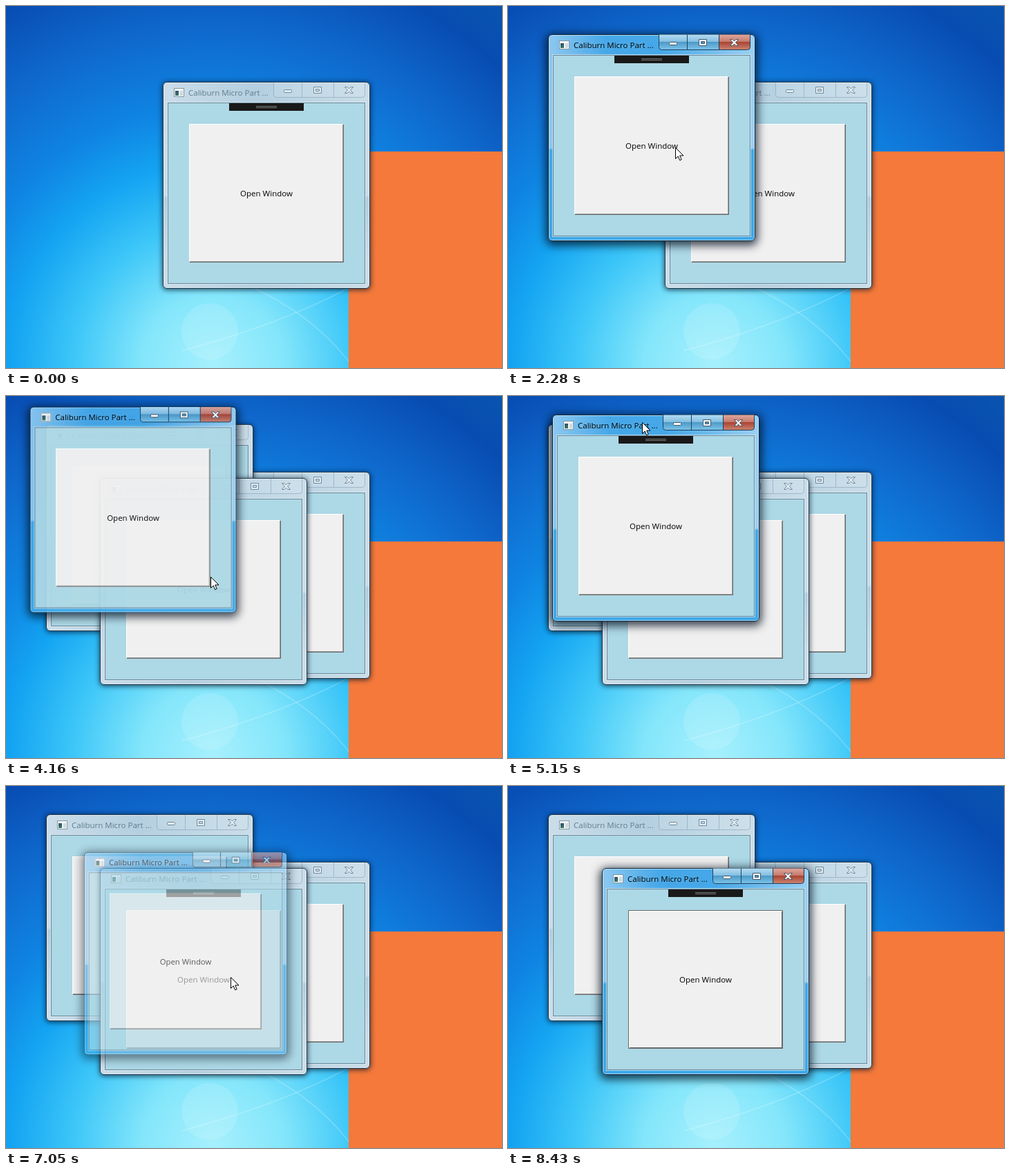
These frames come from a looping animation (718x525 px, 9020 ms). An HTML page:

```html
<!DOCTYPE html>
<html lang="en">
<head>
<meta charset="utf-8">
<style>
html, body { margin: 0; width: 100%; height: 100%; overflow: hidden; }
body { position: relative; font: 11.5px "Open Sans", "Noto Sans", sans-serif; color: #000; }
div, svg { position: absolute; box-sizing: border-box; }
.win {
  left: 0; top: 0; width: 300px; height: 300px; border-radius: 6px;
  border: 1px solid #26384a;
  background: linear-gradient(#cfdfe900 0 55%, #8fb4cd66 56%, #cfdfe900 85%),
    linear-gradient(90deg, #cbdde9, #b4cfe0 45%, #cadde8);
  box-shadow: inset 0 0 0 1px #e4f0f7cc, 0 1px 7px 1px #001428b0;
}
.win.active {
  background: linear-gradient(#0000 0 55%, #3ea8e8 56%),
    linear-gradient(90deg, #8cc8f0, #46a8e8 28% 55%, #9bd0f2);
  border-color: #10283c;
  box-shadow: inset 0 0 0 1px #c4e8fccc, 0 3px 13px 3px #000d1cc8;
}
.win > * { margin: -1px 0 0 -1px; }
.icon { left: 16px; top: 9px; width: 15px; height: 13px; border: 1px solid #8598a4; background: #f4f8fa; }
.icon::before { content: ""; position: absolute; left: 1px; top: 3px; width: 5px; height: 7px; background: linear-gradient(#31506b, #3c7a66); }
.icon::after { content: ""; position: absolute; left: 8px; top: 3px; width: 4px; height: 7px; background: #cfd8de; }
.title { left: 37px; top: 8px; line-height: 16px; white-space: pre; color: #5f7d8f; }
.active .title { color: #000; text-shadow: 0 0 5px #9cd4f688; }
.caption { left: 160px; top: 0; }
.caption .cell { fill: #dcebf222; }
.caption .edge { fill: none; stroke: #7f9bae88; }
.caption .glyph { fill: #e2edf3; stroke: #71899a; }
.active .cell { fill: url(#blueCell); }
.active .cell.close { fill: url(#redCell); }
.active .hot.cell.close { fill: #e05c38; }
.active .edge { stroke: #1d425d; }
.active .glyph { fill: #fff; stroke: #40586a; }
.client { left: 7px; top: 30px; width: 286px; height: 263px; background: #add8e6; border: 1px solid #6b8797; box-shadow: 0 0 0 1px #e2f1f8aa; }
.bar { left: 96px; top: 31px; width: 108px; height: 11px; background: #191919; }
.bar::after { content: ""; position: absolute; left: 39px; top: 4px; width: 30px; height: 3px; border: solid #777; border-width: 1px 0; box-sizing: border-box; }
.button {
  left: 38px; top: 61px; width: 224px; height: 201px; line-height: 200px; text-align: center;
  background: #f0f0f0; border: 1px solid; border-color: #fff #696969 #696969 #fff;
  box-shadow: inset -1px -1px #a0a0a0;
}
.focus .button { border-color: #696969; box-shadow: inset 1px 1px #fff, inset -1px -1px #696969; }
#cursor { left: 0; top: 0; z-index: 9; }
</style>
</head>
<body>
<svg width="718" height="525">
  <defs>
    <radialGradient id="sky" gradientUnits="userSpaceOnUse" cx="300" cy="520" r="680">
      <stop offset="0" stop-color="#a6f0fd"/><stop offset=".15" stop-color="#84e6fb"/>
      <stop offset=".3" stop-color="#3cc6f8"/><stop offset=".43" stop-color="#14a4f2"/>
      <stop offset=".55" stop-color="#0f84e2"/><stop offset=".72" stop-color="#0f68cc"/>
      <stop offset=".88" stop-color="#084cb2"/><stop offset="1" stop-color="#0a56ae"/>
    </radialGradient>
    <linearGradient id="blueCell" x2="0" y2="1">
      <stop offset="0" stop-color="#b4dcf2"/><stop offset=".45" stop-color="#86bfe2"/>
      <stop offset=".5" stop-color="#4d9ac8"/><stop offset="1" stop-color="#7cc4ea"/>
    </linearGradient>
    <linearGradient id="redCell" x2="0" y2="1">
      <stop offset="0" stop-color="#dfa79c"/><stop offset=".45" stop-color="#c77b6d"/>
      <stop offset=".5" stop-color="#aa4434"/><stop offset="1" stop-color="#cc8470"/>
    </linearGradient>
  </defs>
  <rect width="718" height="525" fill="url(#sky)"/>
  <g fill="none" stroke="#fff" stroke-opacity=".22" stroke-width="1.5">
    <path d="M255 500Q420 455 520 395"/>
    <path d="M350 405Q450 450 503 525"/>
  </g>
  <circle cx="295" cy="472" r="41" fill="#fff" fill-opacity=".12"/>
  <rect x="496" y="211" width="314" height="314" fill="#f4793b"/>
</svg>
<svg id="cursor" width="14" height="21">
  <path d="M.5.5V16.5L4.2 13 6.7 18.8 9.2 17.7 6.7 12H12Z" fill="#fff" stroke="#000"/>
</svg>
<script>
const LOOP = 9020, FADE = 200;

// Screen updates come in bursts: start, end, number of updates.
const bursts = [
  [110, 730, 9], [900, 1280, 6], [1600, 2360, 11], [2740, 3610, 12], [3680, 3760, 2], [3990, 4840, 12],
  [4920, 4990, 2], [5150, 6010, 12], [6180, 6800, 9], [6960, 7820, 12], [7960, 8430, 7]
];

// Each key: time, x, y.
const pointer = [
  [0, 607, 530], [110, 607, 514], [730, 359, 118], [900, 359, 118], [1280, 380, 260], [1700, 380, 260],
  [2360, 224, 198], [3180, 224, 198], [3610, 324, 270], [3760, 296, 262], [4250, 296, 262],
  [4840, 219, 19], [4990, 164, 26], [5150, 194, 38], [5540, 275, 72], [6010, 424, 71], [6180, 424, 71],
  [6800, 325, 277], [7350, 325, 277], [7820, 382, 103], [7960, 382, 103], [8430, 630, 530]
];

const windows = [
  { path: [[0, 227, 110]], open: -FADE, active: [[900, 1600]], bar: [[0, 1600]] },
  { path: [[0, 58, 41]], open: 1750, active: [[1750, 2960]], bar: [[2050, 2740]] },
  { path: [[0, 136, 119]], open: 2960, active: [[2960, 3990], [6180, 6960], [7960, LOOP]],
    bar: [[3250, 3990], [6180, 7100], [7960, LOOP]], focus: [[7960, LOOP]] },
  { path: [[4990, 34, 15], [5150, 64, 27], [5540, 145, 61]], open: 3990, close: 6180,
    active: [[3990, LOOP]], bar: [[4300, 6180]] },
  { path: [[0, 110, 93]], open: 6960, close: 7960, active: [[6960, LOOP]], bar: [[7260, 7960]] }
];

const markup = `
  <div class="icon"></div><div class="title">Caliburn Micro Part ...</div>
  <svg class="caption" width="133" height="24">
    <path class="cell" d="M.5.5H87.5V22.5H4.5Q.5 22.5 .5 18.5Z"/>
    <path class="cell close" d="M87.5.5H132.5V18.5Q132.5 22.5 128.5 22.5H87.5Z"/>
    <path class="edge" d="M.5.5V18.5Q.5 22.5 4.5 22.5H128.5Q132.5 22.5 132.5 18.5V.5M41.5.5V22M87.5.5V22"/>
    <rect class="glyph" x="15.5" y="11.5" width="11" height="4" rx="1"/>
    <path class="glyph" fill-rule="evenodd" d="M58.5 7.5H69.5V16.5H58.5ZM61.5 10.5V13.5H66.5V10.5Z"/>
    <path class="glyph" d="M103.5 7.5H107L109.5 10 112 7.5H115.5L111.5 12 115.5 16.5H112L109.5 14 107 16.5H103.5L107.5 12Z"/>
  </svg>
  <div class="client"></div><div class="bar"></div><div class="button">Open Window</div>`;

for (const win of windows) {
  win.el = document.createElement("div");
  win.el.className = "win";
  win.el.innerHTML = markup;
  win.barEl = win.el.querySelector(".bar");
  win.closeEl = win.el.querySelector(".close");
  document.body.append(win.el);
}
const cursor = document.getElementById("cursor");

const clamp = v => Math.min(1, Math.max(0, v));
const during = (spans, t) => !!spans && spans.some(([from, to]) => t >= from && t < to);

function snap(t) {
  const burst = bursts.findLast(b => b[0] <= t);
  if (!burst) return 0;
  const [from, to, count] = burst, step = (to - from) / (count - 1);
  return from + Math.floor((Math.min(t, to) - from) / step + .05) * step;
}

function along(keys, t) {
  const next = keys.findIndex(k => k[0] > t);
  if (next < 1) return (next ? keys.at(-1) : keys[0]).slice(1);
  const [t0, x0, y0] = keys[next - 1], [t1, x1, y1] = keys[next];
  const p = (t - t0) / (t1 - t0);
  return [x0 + (x1 - x0) * p, y0 + (y1 - y0) * p].map(Math.round);
}

function draw(t) {
  const [cx, cy] = along(pointer, t);
  cursor.style.transform = `translate(${cx}px, ${cy}px)`;
  for (const { el, barEl, closeEl, path, open, close = Infinity, active, bar, focus } of windows) {
    const [x, y] = along(path, t);
    const shown = (1 - (1 - clamp((t - open) / FADE)) ** 2) * (1 - clamp((t - close) / FADE));
    el.style.visibility = shown ? "visible" : "hidden";
    el.style.opacity = shown;
    el.style.transform = `translate(${x}px, ${y}px) scale(${.95 + .05 * shown})`;
    el.style.zIndex = t >= close ? 0 : 1;
    el.classList.toggle("active", during(active, t));
    el.classList.toggle("focus", during(focus, t));
    barEl.style.visibility = shown && during(bar, t) ? "visible" : "hidden";
    const dx = cx - x, dy = cy - y;
    closeEl.classList.toggle("hot", dx > 247 && dx < 293 && dy >= 0 && dy < 23);
  }
}

const start = performance.now();
function tick() {
  draw(snap((performance.now() - start) % LOOP));
  requestAnimationFrame(tick);
}
tick();
</script>
</body>
</html>
```
